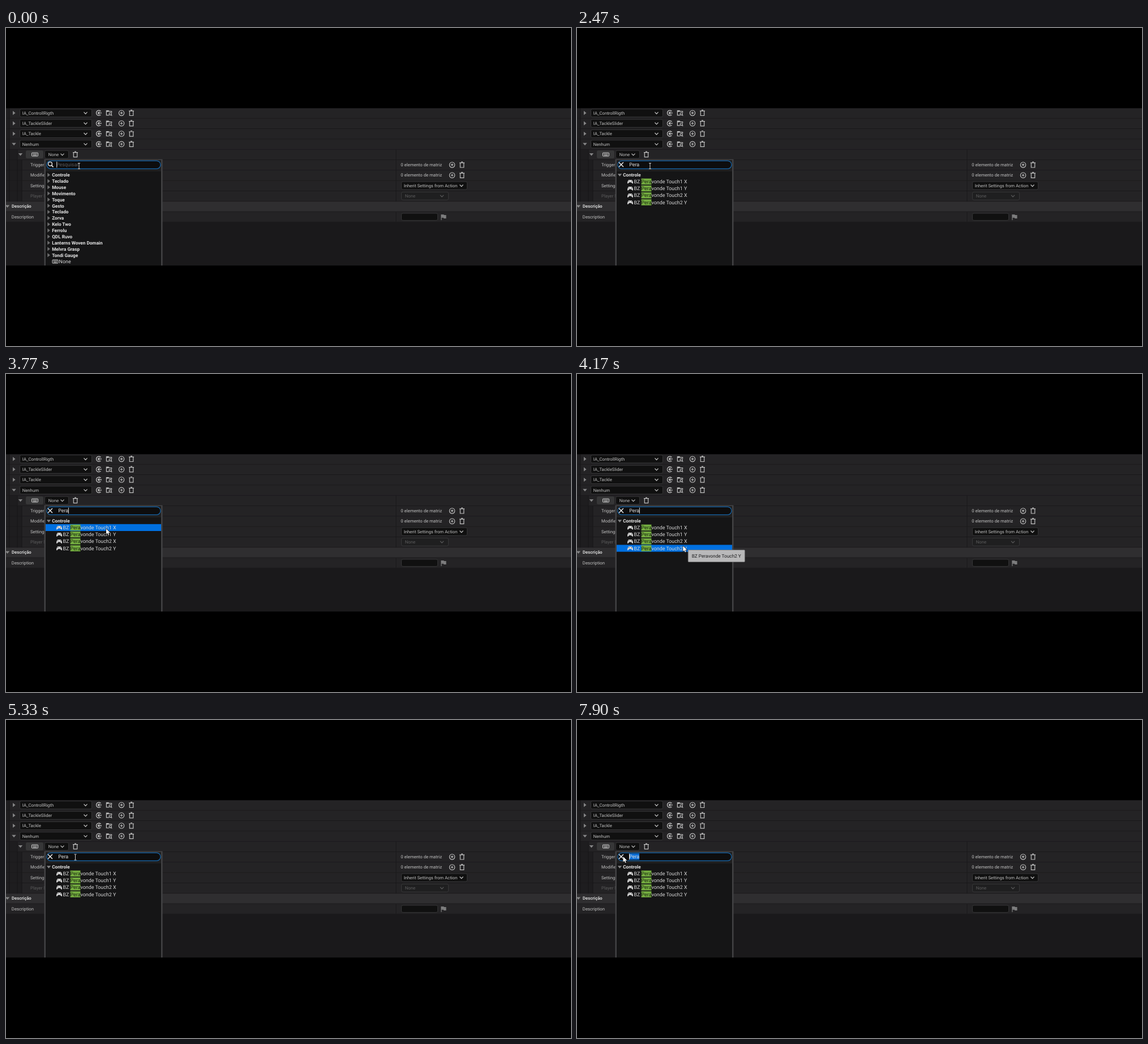
These frames come from a looping animation (998x561 px, 8 s). An HTML page with a canvas:

```html
<!DOCTYPE html>
<html lang="pt">
<head>
<meta charset="utf-8">
<title>Key picker</title>
<style>
  html, body { margin: 0; width: 100%; height: 100%; overflow: hidden; background: #000; }
  canvas { display: block; width: 998px; height: 561px; }
</style>
</head>
<body>
<canvas id="stage" width="998" height="561"></canvas>
<script>
const ctx = document.getElementById('stage').getContext('2d');
const LOOP = 8000;
const TOP = 141.5, ROW = 18.3;
const LIGHT = '#c0c0c0', DIM = '#5c5c5d';
const QUERY = 'Pera';
const AXES = ['Touch1 X', 'Touch1 Y', 'Touch2 X', 'Touch2 Y'];
const GROUPS = ['Controle', 'Teclado', 'Mouse', 'Movimento', 'Toque', 'Gesto', 'Teclado',
  'Zorva', 'Kelo Two', 'Ferrolu', 'QDL Ruvo', 'Lanterns Woven Domain', 'Melvra Grasp', 'Tondi Gauge'];

// time, x, y
const PATH = [
  [0, 129, 243.5], [3000, 129, 243.5], [3280, 168, 279], [3450, 180, 283], [3600, 180, 283],
  [3760, 177, 273], [3830, 177, 273], [4050, 186, 291], [4250, 188, 310], [4520, 177, 308],
  [4670, 177, 308], [4850, 165, 288], [5180, 127, 244], [5330, 122.5, 242], [5500, 122.5, 242],
  [5720, 114, 242], [6050, 91, 242], [6230, 81.5, 241], [8000, 81.5, 241]
];

const mid = i => TOP + ROW * (i + 0.46);
const itemY = i => 270.9 + 12.2 * i;
const itemName = i => 'BZ ' + QUERY + 'vonde ' + AXES[i];

function rect(x, y, w, h, color) {
  ctx.fillStyle = color;
  ctx.fillRect(x, y, w, h);
}

function box(x, y, w, h, r, fill, edge, line = 1) {
  ctx.beginPath();
  ctx.roundRect(x, y, w, h, r);
  if (fill) { ctx.fillStyle = fill; ctx.fill(); }
  if (edge) { ctx.strokeStyle = edge; ctx.lineWidth = line; ctx.stroke(); }
}

function text(str, x, cy, size = 7.75, color = LIGHT, weight = 400) {
  ctx.font = `${weight} ${size}px Roboto, sans-serif`;
  ctx.fillStyle = color;
  ctx.fillText(str, x, cy + size * 0.355);
  return ctx.measureText(str).width;
}

function lines(color, width, ...paths) {
  ctx.strokeStyle = color;
  ctx.lineWidth = width;
  ctx.beginPath();
  for (const p of paths) {
    for (let i = 0; i < p.length; i += 2) i ? ctx.lineTo(p[i], p[i + 1]) : ctx.moveTo(p[i], p[i + 1]);
  }
  ctx.stroke();
}

function poly(color, ...p) {
  ctx.fillStyle = color;
  ctx.beginPath();
  for (let i = 0; i < p.length; i += 2) ctx.lineTo(p[i], p[i + 1]);
  ctx.closePath();
  ctx.fill();
}

function ring(x, y, r, color, width, from = 0, to = Math.PI * 2) {
  ctx.strokeStyle = color;
  ctx.lineWidth = width;
  ctx.beginPath();
  ctx.arc(x, y, r, from, to);
  ctx.stroke();
}

function triangle(x, y, open, color = '#858586') {
  if (open) poly(color, x - 3.7, y - 2, x + 3.7, y - 2, x, y + 2.5);
  else poly(color, x - 2, y - 3.6, x + 2.6, y, x - 2, y + 3.6);
}

const chevron = (x, y, color = LIGHT) => lines(color, 1.2, [x - 3, y - 1.5, x, y + 1.6, x + 3, y - 1.5]);

function trash(x, y) {
  lines(LIGHT, 1.2, [x - 4.5, y - 3.5, x + 4.5, y - 3.5], [x - 1.5, y - 5, x + 1.5, y - 5],
    [x - 3.2, y - 3, x - 3.2, y + 4.6, x + 3.2, y + 4.6, x + 3.2, y - 3]);
}

function plus(x, y) {
  ring(x, y, 4.7, LIGHT, 1.1);
  lines(LIGHT, 1.1, [x - 2.4, y, x + 2.4, y], [x, y - 2.4, x, y + 2.4]);
}

function useArrow(x, y) {
  ring(x, y, 4.5, LIGHT, 1.3, 0.7, 5.6);
  lines(LIGHT, 1.3, [x + 5, y, x - 1.5, y], [x + 1, y - 2.5, x - 1.6, y, x + 1, y + 2.5]);
}

function folder(x, y) {
  lines(LIGHT, 1.2, [x, y + 4, x - 4.6, y + 4, x - 4.6, y - 4, x - 1, y - 4, x + 0.4, y - 2.7,
    x + 4.6, y - 2.7, x + 4.6, y - 0.5]);
  rect(x - 4.6, y - 4, 4, 2, LIGHT);
  ring(x + 2.2, y + 1.6, 2, LIGHT, 1.1);
  lines(LIGHT, 1.2, [x + 3.5, y + 3, x + 5.2, y + 4.8]);
}

function keyboard(x, y, w, color) {
  box(x - w / 2, y - 3, w, 6, 0.8, null, color);
  for (let i = 0; i < 4; i++) rect(x - w / 2 + 1.8 + i * (w - 3) / 4, y - 1.6, 1.3, 1.2, color);
  rect(x - w / 2 + 2, y + 0.6, w - 4, 1.1, color);
}

function gamepad(x, y) {
  poly('#e2e2e2', x - 3, y - 3, x + 3, y - 3, x + 4.6, y, x + 5, y + 3.2, x + 3.8, y + 3.6,
    x + 2, y + 1.3, x - 2, y + 1.3, x - 3.8, y + 3.6, x - 5, y + 3.2, x - 4.6, y);
  rect(x - 3.2, y - 1.4, 2, 0.9, '#333');
  rect(x + 1.4, y - 1.6, 1.4, 1.4, '#333');
}

function combo(x, y, w, label, chevX, off) {
  box(x + 0.5, y - 7, w - 1, 14, 2.5, off ? '#1f1f20' : '#101010', off ? '#383839' : '#353536');
  text(label, x + (w > 100 && w < 120 ? 4.7 : w > 120 ? 4.7 : 6.8), y, 7.75, off ? DIM : LIGHT);
  chevron(chevX, y, off ? DIM : LIGHT);
}

function panel() {
  rect(0, 141.5, 998, 277.5, '#1a191b');
  for (let i = 0; i < 11; i++) {
    const left = i === 9 ? 0 : i === 10 ? 0 : i > 4 ? 28 : i === 4 ? 20 : 6;
    const y = TOP + ROW * i;
    rect(0, y, 998, ROW - 1, '#1e1d1f');
    rect(left, y, 998 - left, ROW - 1, i === 9 ? '#2f2e30' : '#242325');
  }
  rect(5.5, TOP, 1, ROW * 9, '#171718');
  rect(19.5, TOP + ROW * 4, 1, ROW * 5, '#171718');
  rect(27.5, TOP + ROW * 5, 1, ROW * 4, '#171718');
  rect(688.5, TOP + ROW * 4, 1, ROW * 5, '#19191a');
  rect(688.5, TOP + ROW * 10, 1, ROW - 1, '#19191a');

  ['IA_ControllRigth', 'IA_TackleSlider', 'IA_Tackle', 'Nenhum'].forEach((name, i) => {
    const y = mid(i);
    triangle(14, y, i === 3);
    combo(24, y, 128, name, 140.5);
    useArrow(164, y);
    folder(182, y);
    plus(204, y);
    trash(221.5, y);
  });

  const keyY = mid(4);
  triangle(25.5, keyY, true);
  box(35, keyY - 7, 31, 14, 2.5, '#363637');
  keyboard(51, keyY, 11, '#d0d0d0');
  combo(68, keyY, 43, 'None', 99.5);
  trash(122.5, keyY);

  ['Triggers', 'Modifiers', 'Settings Behavior', 'Player Mappable Key'].forEach((name, i) =>
    text(name, 43, mid(5 + i), 7.75, i === 3 ? DIM : LIGHT));
  for (const i of [5, 6]) {
    text('0 elemento de matriz', 697.3, mid(i));
    plus(788, mid(i));
    trash(805.5, mid(i));
  }
  combo(698, mid(7), 117, 'Inherit Settings from Action', 804.5);
  combo(698, mid(8), 84, 'None', 770, true);

  triangle(2.5, mid(9), true);
  text('Descrição', 10, mid(9), 7.75, '#d4d4d4', 700);
  const y = mid(10);
  text('Description', 9.8, y);
  box(698.5, y - 6, 64, 12.5, 2.5, '#101010', '#353536');
  rect(768.3, y - 4, 1.2, 10, '#7c7c7d');
  poly('#7c7c7d', 769, y - 4, 773, y - 4, 774, y - 2.8, 777.5, y - 2.8, 777.5, y + 3, 773.5, y + 3, 772.5, y + 1.8, 769, y + 1.8);
}

function caretOn(t) {
  if (t < 2250) return t < 670 || t >= 1000;
  return (t + 250) % 1000 < 500;
}

function search(t) {
  const count = [1170, 1500, 1800, 2000].filter(at => t >= at).length;
  const typed = QUERY.slice(0, count);
  box(72, 234.3, 201, 14, 7, '#0d0d0e', '#1767ac', 1.3);
  if (!count) {
    ring(78, 239.8, 3.4, '#e8e8e8', 1.4);
    lines('#e8e8e8', 1.6, [80.5, 242.4, 83.5, 245.4]);
    text('Pesquisar', 88.9, 241, 8.9, '#59595a');
  } else {
    lines('#e8e8e8', 1.5, [74, 237, 82, 245], [82, 237, 74, 245]);
  }
  ctx.font = '400 8.9px Roboto, sans-serif';
  const end = 92.2 + ctx.measureText(typed).width;
  const drag = Math.min(1, Math.max(0, (t - 5770) / 270));
  const caret = end - (end - 92.2) * drag;
  if (drag) rect(caret, 235.5, end - caret, 11, '#0b6fd8');
  text(typed, 92.2, 241, 8.9, '#e0e0e0');
  if (caretOn(t)) rect(count ? caret - 0.2 : 89.2, 235.7, 1, 10.6, '#d8d8d8');
}

function item(i, hovered) {
  const y = itemY(i);
  if (hovered) rect(70, y - 6.1, 204, 12.2, '#0070e0');
  gamepad(94, y);
  let x = 100.5;
  x += text('BZ ', x, y, 8.9, '#d8d8d8');
  const w = ctx.measureText(QUERY).width;
  rect(x, y - 5.3, w, 10.6, '#74ad40');
  text(QUERY, x, y, 8.9, '#1a2610');
  text('vonde ' + AXES[i], x + w, y, 8.9, '#d8d8d8');
}

function menu(t, hover) {
  rect(67.5, 231.5, 209, 188, '#424244');
  rect(70, 233, 204, 186, '#1f1f20');
  rect(70, 253, 204, 166, '#151516');
  search(t);
  if (t >= 2270) {
    triangle(75.5, 259.2, true);
    text('Controle', 81.2, 259.2, 8.2, '#e6e6e6', 700);
    AXES.forEach((_, i) => item(i, i === hover));
    return;
  }
  GROUPS.forEach((name, i) => {
    const y = 259.2 + i * 10.88;
    triangle(75.3, y, false, '#6e6e6f');
    text(name, 81.2, y, 8.2, '#e6e6e6', 700);
  });
  keyboard(87, 412, 10, '#d8d8d8');
  text('None', 93.6, 412, 8.9, '#d8d8d8');
}

function pointer(t) {
  const i = Math.max(1, PATH.findIndex(p => p[0] > t));
  const [t0, x0, y0] = PATH[i - 1], [t1, x1, y1] = PATH[i];
  const u = (t - t0) / (t1 - t0), e = u * u * (3 - 2 * u);
  return [x0 + (x1 - x0) * e, y0 + (y1 - y0) * e];
}

function drawPointer(x, y) {
  if (y < 250 && x > 85) {
    lines('#d2d2d2', 1, [x, y - 4.5, x, y + 4.5], [x - 2, y - 5, x + 2, y - 5], [x - 2, y + 5, x + 2, y + 5]);
    return;
  }
  const shape = [0, 0, 0, 9.6, 2.2, 7.6, 3.8, 11, 5.2, 10.3, 3.8, 7.1, 6.8, 6.9];
  const p = shape.map((v, i) => v + (i % 2 ? y : x));
  lines('#111', 1.2, [...p, x, y]);
  poly('#fff', ...p);
}

function tooltip(x, y, i) {
  box(x + 9, y + 7, 100, 21, 1, '#b9b9ba', '#7d7d7e', 0.8);
  text(itemName(i), x + 15.4, y + 17.3, 8.25, '#1c1c1d');
}

function draw(t) {
  rect(0, 0, 998, 561, '#000');
  ctx.save();
  ctx.beginPath();
  ctx.rect(0, 141.5, 998, 277.5);
  ctx.clip();
  panel();
  const [x, y] = pointer(t);
  const row = Math.floor((y - 264.8) / 12.2);
  const hover = t >= 2270 && row >= 0 && row < 4 ? row : -1;
  menu(t, hover);
  const tip = (t >= 3470 && t < 3630) || (t >= 4100 && t < 4720);
  if (tip && hover >= 0) tooltip(x, y, hover);
  drawPointer(x, y);
  ctx.restore();
}

ctx.textRendering = 'geometricPrecision';
const start = performance.now();
function tick() {
  draw((performance.now() - start) % LOOP);
  requestAnimationFrame(tick);
}
tick();
</script>
</body>
</html>
```
